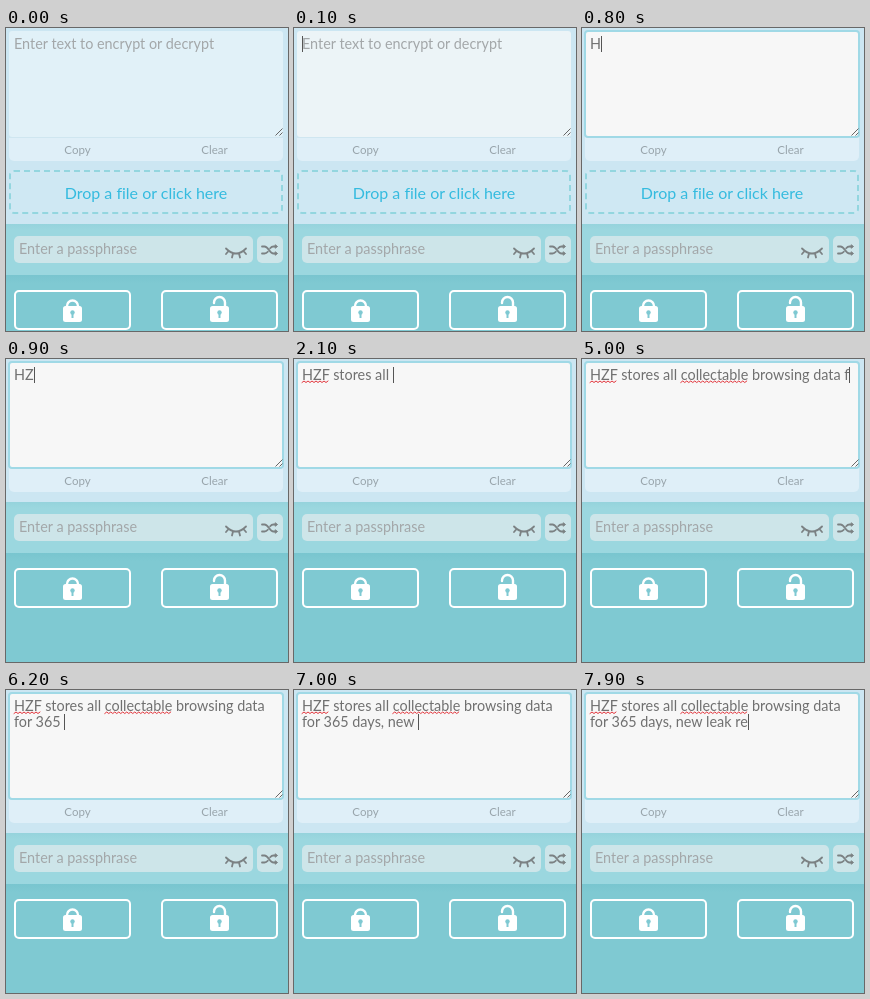
An HTML page that plays this animation: 282x303 px, repeating every 8 s.

```html
<!DOCTYPE html>
<html lang="en">
<head>
<meta charset="utf-8">
<title>Encrypt text</title>
<style>
  html, body { margin: 0; width: 100%; height: 100%; overflow: hidden; background: #cce6f2; }
  #stage { position: relative; width: 282px; height: 303px; overflow: hidden; }
  #stage div, svg { position: absolute; left: 0; top: 0; }
  #stage {
    font: 14.4px Lato, sans-serif;
    text-rendering: optimizeSpeed;
    white-space: pre;
  }
  #stage .typed { left: 8px; color: #707070; }
  #stage .hint { color: #a3a7a9; }
  #stage .small { top: 115px; width: 137px; font-size: 11.5px; color: #98a4ab; text-align: center; }
  #stage #dropZone {
    left: 3px; top: 142px; width: 274px; height: 44px;
    box-sizing: border-box; border: 2px dashed #93d6df; border-radius: 5px;
    background: #cfe8f3; color: #35bbdf;
    font-size: 16px; text-align: center; padding-top: 11px;
  }
  .line { fill: none; stroke-linecap: round; }
</style>
</head>
<body>
<div id="stage">
  <svg width="282" height="303">
    <rect width="282" height="303" fill="#cce6f2"/>
    <path d="M3 109H277V128a5 5 0 0 1-5 5H8a5 5 0 0 1-5-5z" fill="#dfeff8"/>
    <rect id="area" x="3" y="3" width="274" height="106" rx="3"/>
    <path id="divider" d="M3 109.5H277" stroke="#cfe6f0"/>
    <path d="M269.5 107.5l7-7M273.5 107.5l3-3" stroke="#666"/>
    <path class="line" id="waves" stroke="#e2343b"/>
    <rect id="caret" width="1" height="16" fill="#555"/>
  </svg>
  <div class="small" style="left:3px">Copy</div>
  <div class="small" style="left:140px">Clear</div>
  <div class="hint" id="hint" style="left:8px;top:7px">Enter text to encrypt or decrypt</div>
  <div class="typed" id="first" style="top:7px"></div>
  <div class="typed" id="second" style="top:23px"></div>
  <div id="dropZone">Drop a file or click here</div>

  <div id="lower">
    <svg width="282" height="171" viewBox="0 196 282 171">
      <defs>
        <linearGradient id="band" x2="0" y2="1">
          <stop offset="0" stop-color="#95d3dc"/>
          <stop offset=".12" stop-color="#9bd7df"/>
        </linearGradient>
        <linearGradient id="floor" x2="0" y2="1">
          <stop offset="0" stop-color="#79c5cf"/>
          <stop offset=".07" stop-color="#7fc9d2"/>
        </linearGradient>
        <g id="lockBody">
          <rect x="-9.5" width="19" height="16" rx="2.5" fill="#fff"/>
          <circle cy="6.500" r="2.2" fill="#7fc9d2"/>
          <path d="M-1 7h2v5h-2z" fill="#7fc9d2"/>
        </g>
      </defs>
      <rect y="196" width="282" height="52" fill="url(#band)"/>
      <rect y="247" width="282" height="120" fill="url(#floor)"/>
      <rect x="8" y="208" width="239" height="27" rx="5" fill="#cde5e9"/>
      <rect x="251" y="208" width="26" height="27" rx="5" fill="#cde5e9"/>
      <g class="line" stroke="#7b8183" stroke-width="1.8">
        <path d="M220 220.500q10 10 20 0M222.500 223l-2.500 3M227 225.500l-1 4M233 225.500l1 4M237.500 223l2.500 3"/>
        <path d="M256 218.500h2.500c4 0 5 7 9 7h2M256 225.500h2.500c1.500 0 2.500-.8 3.300-1.800M264.200 220.300c.8-1 1.800-1.800 3.300-1.800h2"/>
        <path d="M269.500 217l2 1.500-2 1.500zM269.500 224l2 1.500-2 1.500z" fill="#7b8183" stroke-width="1"/>
      </g>
      <g class="line" stroke="#fff" stroke-width="2">
        <rect x="9" y="263" width="115" height="38" rx="4"/>
        <rect x="156" y="263" width="115" height="38" rx="4"/>
        <path d="M61 279v-1a5.500 5.500 0 0 1 11 0v1M208 275v-.5a5.500 5.500 0 0 1 11 0v4.500" stroke-width="2.4"/>
      </g>
      <use href="#lockBody" x="66.500" y="278"/>
      <use href="#lockBody" x="213.500" y="278"/>
    </svg>
    <div class="hint" style="left:13px;top:16px">Enter a passphrase</div>
  </div>
</div>
<script>
const LOOP = 8000;
const MESSAGE = "HZF stores all collectable browsing data for 365 days, new leak re";
const WRAP_AT = 41;
const MISSPELT = ["HZF", "collectable"];

// Bursts of typing: start time, then characters added at each 100 ms tick.
const BURSTS = [
  [800, "11"], [1200, "121211121"], [2100, "111111111"], [3000, "1121121"],
  [3800, "1111"], [4400, "11111"], [5000, "112"], [5600, "111"],
  [6200, "111112112"], [7100, "111"], [7500, "11"], [7800, "11"]
];

const $ = id => document.getElementById(id);
const show = (id, on) => { $(id).style.visibility = on ? "visible" : "hidden"; };
const set = (id, attrs) => {
  for (const name in attrs) $(id).setAttribute(name, attrs[name]);
};

function typedCount(time) {
  let count = 0;
  for (const [start, steps] of BURSTS)
    [...steps].forEach((step, i) => { if (time >= start + i * 100) count += +step; });
  return count;
}

// Width of the first characters of a line, as laid out.
function widthOf(id, length) {
  if (!length) return 0;
  const range = document.createRange();
  range.setStart($(id).firstChild, 0);
  range.setEnd($(id).firstChild, length);
  return range.getBoundingClientRect().width;
}

function wave(from, to) {
  let d = `M${from} 23.5`;
  for (let x = from + 2, up = true; x <= to; x += 2, up = !up) d += `L${x} ${up ? 22 : 23.5}`;
  return d;
}

function drawText(time) {
  const count = typedCount(time);
  const wrapped = count > WRAP_AT + 1;
  const split = wrapped ? WRAP_AT : count;
  $("first").textContent = MESSAGE.slice(0, split);
  $("second").textContent = MESSAGE.slice(split, count);

  const caretX = 8 + (wrapped ? widthOf("second", count - split) : widthOf("first", count));
  set("caret", { x: Math.round(caretX), y: wrapped ? 24 : 8 });
  show("caret", (time >= 100 && time < 600) || time >= 800);
  show("hint", count === 0);

  const marks = MISSPELT.map(word => {
    const start = MESSAGE.indexOf(word), end = start + word.length;
    return count > end ? wave(8 + widthOf("first", start), 8 + widthOf("first", end)) : "";
  });
  set("waves", { d: marks.join("") });
}

function draw(time) {
  const focused = time >= 300;
  const fill = focused ? "#f7f7f7" : time >= 100 ? "#ecf4f7" : "#e1f1f8";
  set("area", { fill, stroke: focused ? "#a0d9e6" : "none", "stroke-width": 2 });
  show("divider", !focused);
  drawText(time);

  const compact = time >= 900;
  show("dropZone", !compact);
  $("lower").style.top = (compact ? 143 : 196) + "px";
}

function frame() {
  draw(performance.now() % LOOP);
  requestAnimationFrame(frame);
}
frame();
</script>
</body>
</html>
```
